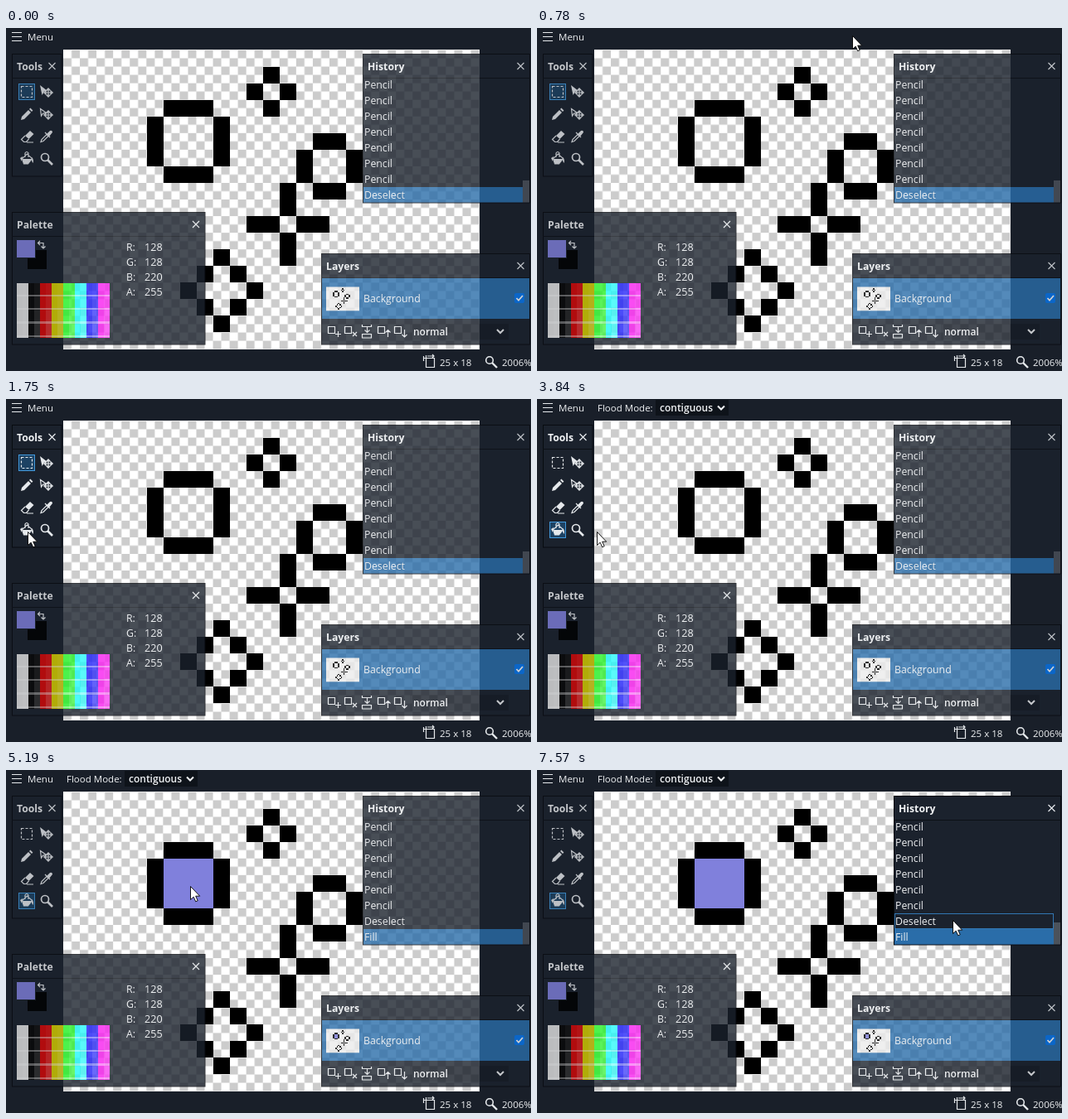
An HTML page for the animation above (8 s loop, 633 by 414 pixels).

```html
<!DOCTYPE html>
<html lang="en">
<head>
<meta charset="utf-8">
<title>Pixel editor</title>
<style>
html, body { margin: 0; width: 100%; height: 100%; overflow: hidden; background: #191f29; }
svg { display: block; width: 633px; height: 414px; }
text { font: 12.3px "Open Sans", "Noto Sans", sans-serif; fill: #f0f2f4; white-space: pre; }
.bar { font-size: 11.5px; }
.title { font-weight: 700; font-size: 12.2px; }
.select { font-weight: 600; font-size: 12px; }
.num { font-size: 12.6px; }
.icon { fill: none; stroke: #e6e9ec; stroke-width: 1.2; }
.icon .solid { fill: #e6e9ec; stroke: none; }
.panel { opacity: .8; }
.frame { fill: #1b222d; stroke: #080b10; }
.rule { stroke: #0c1016; }
.accent { fill: #2a6da9; }
</style>
</head>
<body>
<svg viewBox="0 0 633 414">
  <defs>
    <pattern id="checker" x="69" y="26.5" width="20.06" height="20.06" patternUnits="userSpaceOnUse">
      <path fill="#fff" d="M0 0h20.06v20.06H0z"/>
      <path fill="#ccc" d="M10.03 0h10.03v10.03H10.03zM0 10.03h10.03v10.03H0z"/>
    </pattern>
    <g id="art" shape-rendering="crispEdges">
      <path id="fill" fill="#8080dc" d="M6 4h3v3h-3z"/>
      <path id="ink"/>
    </g>
    <g id="arrows">
      <path class="solid" d="M8 4l2-2.2 2 2.2zM8 10l2 2.2 2-2.2zM7 5l-2.2 2L7 9zM13 5l2.2 2L13 9z"/>
      <path d="M10 3v8M6 7h8"/>
    </g>
    <path id="chevron" d="M-4-2L0 2 4-2" fill="none" stroke="#f0f2f4" stroke-width="2"/>
  </defs>

  <rect x="69" y="26" width="502" height="362" fill="url(#checker)"/>
  <use href="#art" transform="translate(69.6 26.6) scale(20.04)"/>

  <path class="icon" stroke-width="1.6" d="M7 5.5h12M7 10.5h12M7 15.5h12"/>
  <text class="bar" x="26" y="15">Menu</text>
  <g id="mode">
    <text class="bar" x="73" y="15">Flood Mode:</text>
    <rect x="143" y="1" width="88" height="19" fill="#0e131a"/>
    <text class="select" x="148" y="14.5">contiguous</text>
    <use href="#chevron" x="222" y="10.5"/>
  </g>

  <g class="icon">
    <path d="M506.5 398.5h10v11h-10zM503 398.5h3M506.5 395v3M503.5 396v6M508 396h8M514 394l2 2-2 2"/>
    <circle cx="583" cy="401" r="4.3" stroke-width="1.6"/><path stroke-width="2.4" d="M586 404l6 6"/>
  </g>
  <text class="bar" x="523" y="407.5">25 x 18</text>
  <text class="bar" x="598" y="407.5">2006%</text>

  <g class="panel" id="tools" data-box="7 31 60 148" data-title="Tools">
    <rect id="tool" x="15.5" width="19" height="19" fill="#1d4263" stroke="#4199dc"/>
    <g class="icon">
      <path stroke-dasharray="3 2" d="M18.5 70.5h13v13h-13z"/>
      <path class="solid" d="M41 69l9 7-4 .6-2.5 4.4z"/><use href="#arrows" x="41" y="71"/>
      <path class="solid" d="M18 111l1-4 8-8 3 3-8 8zM28 98l1.4-1.4 3 3L31 101z"/>
      <path d="M41.5 97.5l7 5-4 .6-2 3z"/><use href="#arrows" x="41" y="98"/>
      <path class="solid" d="M23 130l6-6 4.5 4-6 6z"/>
      <path d="M23 130l-4.5 4.5 3 3h3l3-3.5M25 138h8"/>
      <path d="M42 137.5l1-3 6-6 2 2-6 6zM47 126l6 6"/><path class="solid" d="M49 128l4-4q3-1 3 2l-4 5z"/>
      <path d="M19.5 157.5l6-5.5 6 5.5-5 6.5h-5zM23 156v-5q2-3 4 0v5"/>
      <path class="solid" d="M20 158h11l-4.5 6h-5zM31 156q3 3 1.5 7-2-2-1.5-7zM17 157l3-2-1 6z"/>
      <circle cx="47" cy="156" r="4.5" stroke-width="1.7"/><path stroke-width="2.6" d="M50 159l6 6"/>
    </g>
  </g>

  <g class="panel" id="history" data-box="430 31 201.5 180" data-title="History">
    <rect class="accent" x="431" y="192" width="192" height="18.5"/>
    <rect id="hover" x="431.5" y="173.5" width="191" height="18" fill="#1b222d" stroke="#3277b3"/>
    <rect x="623" y="184" width="8" height="26.5" fill="#4b525b"/>
    <g id="steps"></g>
  </g>

  <g class="panel" id="palette" data-box="7 222 233 160" data-title="Palette">
    <path d="M26 268h23v23H26z"/>
    <path fill="#8080dc" stroke="#1b222d" d="M12.5 255.5h23v22h-23z"/>
    <path class="icon" d="M39 259.5h6v6M41 257l-2.5 2.5L41 262M42.5 263.5l2.5 2.5 2.5-2.5"/>
    <g id="swatches" shape-rendering="crispEdges"></g>
    <g id="channels"></g>
  </g>

  <g class="panel" id="layers" data-box="380 272 251.5 110" data-title="Layers">
    <rect class="accent" x="381" y="302" width="250" height="49"/>
    <rect x="386" y="312.5" width="40" height="28.8" fill="#ececec"/>
    <use href="#art" transform="translate(386 312.5) scale(1.6)"/>
    <text x="431" y="331">Background</text>
    <rect x="613" y="320" width="12" height="12" rx="2" fill="#0878f0"/>
    <path d="M615.5 326l2.5 2.8 5-5.8" fill="none" stroke="#fff" stroke-width="1.7"/>
    <g class="icon">
      <path d="M388.5 360.5h8v8h-8zM400.5 366v7M397 369.5h7"/>
      <path d="M408.5 360.5h8v8h-8zM418 367l5 5M423 367l-5 5"/>
      <path d="M429.5 358v2.5h11V358M435.5 360v7M432.5 364.500l3 3 3-3M429.500 374v-4.500h11v4.500z"/>
      <path d="M448.500 360.500h8v8h-8zM460.500 373v-8M457.500 367.500l3-3 3 3"/>
      <path d="M468.500 360.500h8v8h-8zM480.500 364v8M477.500 370l3 3 3-3"/>
    </g>
    <rect x="487" y="357" width="119" height="19" fill="#0e131a" opacity=".35"/>
    <text class="select" x="491" y="370.500">normal</text>
    <use href="#chevron" x="596" y="366"/>
  </g>

  <path id="cursor" fill="#fff" stroke="#000" stroke-width=".9" d="M.5.5V16.500L4.200 13.200 6.700 18.800 9.200 17.700 6.700 12.200H11.700z"/>
</svg>
<script>
const $ = id => document.getElementById(id);
const show = (el, on) => el.setAttribute('visibility', on ? 'visible' : 'hidden');

// Strokes as "column row width height" in image pixels
$('ink').setAttribute('d', `12 1 1 1,11 2 1 1,13 2 1 1,12 3 1 1,
  6 3 3 1,5 4 1 3,9 4 1 3,6 7 3 1,
  15 5 2 1,14 6 1 2,17 6 1 2,15 8 2 1,
  13 8 1 2,11 10 2 1,14 10 2 1,13 11 1 2,
  9 12 1 1,8 13 1 1,10 13 1 1,7 14 1 1,11 14 1 1,8 15 1 1,10 15 1 1,9 16 1 1`
  .split(',').map(s => {
    const [x, y, w, h] = s.trim().split(' ');
    return `M${x} ${y}h${w}v${h}h-${w}z`;
  }).join(''));

for (const panel of document.querySelectorAll('.panel')) {
  const [x, y, w, h] = panel.dataset.box.split(' ').map(Number);
  const right = x + w - (w > 100 ? 11 : 11.5);
  panel.innerHTML = `<rect class="frame" x="${x + .5}" y="${y + .5}" width="${w - .5}" height="${h - .5}"/>
    <path class="rule" d="M${x} ${y + 29.5}h${w}"/>
    <text class="title" x="${x + 6}" y="${y + 19.5}">${panel.dataset.title}</text>
    <path class="icon" d="M${right - 4} ${y + 11}l8 8m0-8l-8 8"/>` + panel.innerHTML;
}

$('steps').innerHTML = Array.from({length: 8}, (_, i) =>
  `<text x="432" y="${73 + 19 * i}">Pencil</text>`).join('');
const steps = $('steps').children;

$('channels').innerHTML = ['R:128', 'G:128', 'B:220', 'A:255'].map((s, i) => {
  const y = 268.5 + 18 * i;
  return `<text x="145" y="${y}">${s.slice(0, 2)}</text><text class="num" x="167" y="${y}">${s.slice(2)}</text>`;
}).join('');

const hues = ['#e4e4e4', '#080808', '#d80808', '#d8d000', '#20f020', '#20f8f8', '#2020f8', '#f820f0'];
$('swatches').innerHTML = hues.map((hue, c) => [0, 1, 2, 3].map(r => {
  const x = 13 + 14 * c, y = 308 + 16.4 * r;
  return `<rect x="${x}" y="${y}" width="14" height="16.4" fill="${hue}"/>
    <rect x="${x + 7}" y="${y}" width="7" height="16.4" fill="#fff" opacity="${.04 + .04 * r}"/>
    <rect x="${x}" y="${y + 13.5}" width="14" height="2.5" fill="#fff" opacity=".4"/>`;
}).join('')).join('');

// Pointer moves: start, end, number of positions, from, to; each holds until the next
const moves = [
  [490, 780, 4, 484, 200, 380, 9],
  [600, 690, 2, 449, 211, 415, 110],
  [780, 889, 1, 380, 9, 380, 9],
  [1070, 1650, 7, 343, 1, 30, 170],
  [1750, 3840, 1, 26, 160, 26, 160],
  [3840, 4610, 9, 72, 160, 219, 130],
  [4700, 4900, 3, 220, 133, 222, 140],
  [7080, 7470, 5, 245, 145, 505, 194],
  [7570, 8000, 1, 501, 181, 501, 181]
];

function pointer(t) {
  if (t < 490 || t >= 890 && t < 1070) return null;
  const [t0, t1, n, x0, y0, x1, y1] = moves.findLast(m => t >= m[0]);
  if (n === 1) return [x0, y0];
  const k = Math.min(1, Math.floor((t - t0 + 1) / (t1 - t0) * (n - 1)) / (n - 1));
  const ease = k * (2 - k);
  return [x0 + (x1 - x0) * ease, y0 + (y1 - y0) * ease];
}

const ramp = (t, start) => Math.max(0, Math.min(1, (t - start) / 100));
const hoverOpacity = (t, on, off) => .8 + .2 * (ramp(t, on) - ramp(t, off));

function draw(t) {
  const bucket = t >= 3040, filled = t >= 5100, logged = t >= 5190;
  show($('mode'), bucket);
  show($('fill'), filled);
  show($('hover'), t >= 7470);
  $('tool').setAttribute('y', bucket ? 148.5 : 67.5);
  steps[6].textContent = logged ? 'Deselect' : 'Pencil';
  steps[7].textContent = logged ? 'Fill' : 'Deselect';
  $('history').style.opacity = t < 2000 ? hoverOpacity(t, 490, 690) : hoverOpacity(t, 7280, 9000);
  $('tools').style.opacity = hoverOpacity(t, 1550, 3935);
  const at = pointer(t);
  show($('cursor'), at);
  if (at) $('cursor').setAttribute('transform', `translate(${at.map(Math.round)})`);
}

function tick() {
  draw(performance.now() % 8000);
  requestAnimationFrame(tick);
}
tick();
</script>
</body>
</html>
```
